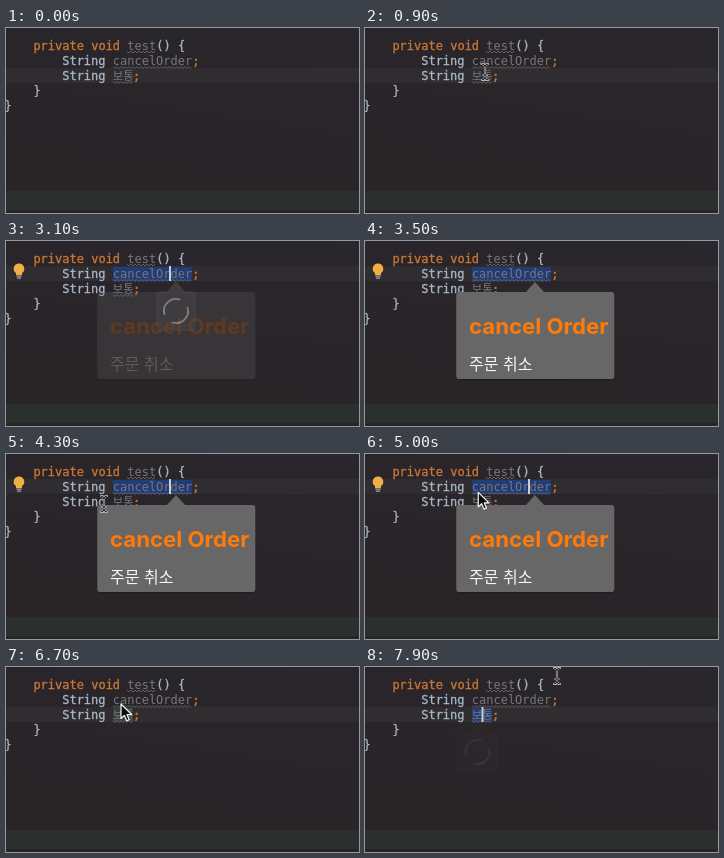
An HTML page that plays this animation: 353x185 px, repeating every 8000 ms.

```html
<!DOCTYPE html>
<html lang="ko">
<head>
<meta charset="utf-8">
<title>Translate popup</title>
<style>
  html, body { margin: 0; width: 100%; height: 100%; overflow: hidden; background: #292528; }
  svg { display: block; width: 353px; height: 185px; }
  text { white-space: pre; }
  .code { font: 12px "DejaVu Sans Mono", "Noto Sans CJK KR", monospace; fill: #a9b7c6; stroke: #a9b7c6; stroke-width: .3; }
  .key { fill: #cc7832; stroke: #cc7832; }
  .dim { fill: #77787b; stroke: none; }
  .hangul { font: 11.3px "Noto Sans CJK KR", sans-serif; }
  .wave { fill: none; stroke: #707070; stroke-width: .8; }
  .title { font: bold 22.2px Inter, sans-serif; fill: #ff7a08; }
  .meaning { font: 500 16px "Noto Sans CJK KR", sans-serif; fill: #f6f6f6; }
</style>
</head>
<body>
<svg viewBox="0 0 353 185">
  <defs>
    <linearGradient id="bg" x1="1" y1="0" x2=".7" y2="1">
      <stop stop-color="#29262d"/>
      <stop offset="1" stop-color="#292426"/>
    </linearGradient>
    <path id="beamShape" d="M-3 -8Q0 -8 0 -5.5Q0 -8 3 -8M0 -5.5V5.5M-3 8Q0 8 0 5.5Q0 8 3 8M-1.5 3H1.5"/>
  </defs>
  <rect width="353" height="185" fill="url(#bg)"/>
  <rect y="163" width="353" height="19" fill="#2b302f"/>
  <rect id="line" width="353" height="15" fill="#302d31"/>
  <rect id="mark" height="14"/>

  <g class="code">
    <text x="27.4" y="21.5"><tspan class="key">private void</tspan> <tspan class="dim">test</tspan>() {</text>
    <text x="56.2" y="37">String <tspan class="dim">cancelOrder</tspan><tspan class="key">;</tspan></text>
    <text x="56.2" y="52">String <tspan class="dim hangul" x="106.8">보통</tspan><tspan class="key" x="127">;</tspan></text>
    <text x="27.4" y="67">}</text>
    <text x="-1.5" y="82">}</text>
  </g>
  <g id="waves"></g>
  <rect id="caret" width="2" height="15" fill="#d0d0d0"/>

  <g id="bulb">
    <path d="M13 22.5a5.2 5.2 0 0 1 3 9.5v2h-6v-2a5.2 5.2 0 0 1 3-9.5z" fill="#f0ae45"/>
    <path d="M10.3 35.2h5.4M11 37.2h4" stroke="#a5a5a5" stroke-width="1.2"/>
  </g>

  <g id="popup">
    <path d="M93 52H248V137Q248 139.5 245 139.5H96Q93 139.5 93 137Z" fill="#1a1719" opacity=".5"/>
    <path d="M94 51H161L170 41L179 51H246.5Q249.3 51 249.3 54V135Q249.3 138 246.5 138H94Q91.3 138 91.3 135V54Q91.3 51 94 51Z" fill="#6a6a6a" fill-opacity=".97"/>
    <text class="title" x="104" y="92.5">cancel Order</text>
    <text class="meaning" x="104" y="129">주문 취소</text>
  </g>

  <g id="loader">
    <path d="M-16 -19H-9L0 -29L9 -19H16Q19 -19 19 -16V16Q19 19 16 19H-16Q-19 19 -19 16V-16Q-19 -19 -16 -19Z" fill="#4a4a4a" fill-opacity=".7" stroke="#686868" stroke-width=".6"/>
    <path id="ring" d="M-11.3 4.1A12 12 0 0 1 4.1 -11.3M11.3 -4.1A12 12 0 0 1 -4.1 11.3" fill="none" stroke="#c4c4c4" stroke-width="1.8"/>
  </g>

  <g id="beam" fill="none" stroke-linecap="round">
    <use href="#beamShape" stroke="#e0e0e0" stroke-width="2.1"/>
    <use href="#beamShape" stroke="#161616" stroke-width="1"/>
  </g>
  <path id="arrow" d="M0 0V14.5L3.4 11.4L5.7 16.8L8.2 15.7L6 10.5H10.7Z" fill="#0b0b0b" stroke="#f5f5f5" stroke-width="1.2" stroke-linejoin="round"/>
</svg>
<script>
const LOOP = 8000;
const el = id => document.getElementById(id);
const set = (id, attrs) => {
  for (const name in attrs) el(id).setAttribute(name, attrs[name]);
};
const show = (id, opacity) => set(id, { opacity: +opacity });
const within = (t, from, to) => t >= from && t < to;
const ramp = (t, from, to) => Math.min(1, Math.max(0, (t - from) / (to - from)));
const smooth = p => p * p * (3 - 2 * p);
const lastOf = (steps, t) => steps.filter(s => s.at <= t).pop();

const ROW = { 2: 26, 3: 41 };
const GREEN = "#344134", BLUE = "#223c75";

const carets = [
  { at: 0, row: 3, x: -9 },
  { at: 1900, row: 2, x: 163 },
  { at: 5200, row: 2, x: 106 },
  { at: 6100, row: 3, x: 106 },
  { at: 7450, row: 3, x: 116.5 }
];

const marks = [
  { at: 0 },
  { at: 2200, row: 2, color: GREEN },
  { at: 2450, row: 2, color: BLUE },
  { at: 5200, row: 2, color: GREEN },
  { at: 6100, row: 3, color: GREEN },
  { at: 7450, row: 3, color: BLUE }
];

// Pointer visits: time, x, y
const pointer = [
  [100, 212, 113], [900, 120, 44], [1700, 164, 33],
  [3700, 254, 143], [4200, 98, 50], [4600, 98, 50], [5100, 115, 37],
  [6750, 115, 37], [7200, 192, 9], [LOOP, 192, 9]
];

function pointerAt(t) {
  const next = pointer.findIndex(p => p[0] > t);
  if (next < 1) return [-50, -50];
  const [t0, x0, y0] = pointer[next - 1], [t1, x1, y1] = pointer[next];
  const p = smooth(ramp(t, t0, t1));
  return [x0 + (x1 - x0) * p, y0 + (y1 - y0) * p];
}

function loaderOpacity(t) {
  const first = ramp(t, 2550, 2800) * (1 - ramp(t, 2950, 3250));
  return first + ramp(t, 7860, 8260);
}

function addWave(x, y, width) {
  let d = `M${x} ${y}`;
  for (let i = 2; i <= width; i += 2) d += `L${x + i} ${y + (i % 4 ? 2 : 0)}`;
  el("waves").insertAdjacentHTML("beforeend", `<path class="wave" d="${d}"/>`);
}
addWave(121, 23, 28);
addWave(107, 38.5, 79);
addWave(107, 53.5, 20);

function draw(t) {
  const caret = lastOf(carets, t), mark = lastOf(marks, t);
  set("line", { y: ROW[caret.row] - 1 });
  set("caret", { x: caret.x, y: ROW[caret.row] - 1 });
  show("caret", (t - caret.at) % 1000 < 500);

  show("mark", !!mark.row);
  if (mark.row) {
    set("mark", { x: 107, y: ROW[mark.row], width: mark.row === 2 ? 79 : 20, fill: mark.color });
  }

  const earlyBulb = within(t, 2900, 5200);
  show("bulb", earlyBulb || within(t, 6900, 7450));
  set("bulb", { transform: `translate(0 ${earlyBulb ? 0 : 15})` });

  show("popup", ramp(t, 3000, 3400) * (1 - ramp(t, 5400, 5850)));

  const first = t < 5000;
  show("loader", loaderOpacity(t));
  set("loader", { transform: first ? "translate(170 70)" : "translate(112.5 85)" });
  set("ring", { transform: `rotate(${(t - (first ? 3100 : 7900)) * .36})` });

  const [x, y] = pointerAt(t);
  const visible = within(t, 100, 1900) || t >= 3700;
  const isArrow = within(t, 4850, 6950);
  const place = { transform: `translate(${x} ${y})` };
  set("beam", place);
  set("arrow", place);
  show("beam", visible && !isArrow);
  show("arrow", visible && isArrow);
}

const start = performance.now();
function frame() {
  draw((performance.now() - start) % LOOP);
  requestAnimationFrame(frame);
}
frame();
</script>
</body>
</html>
```
